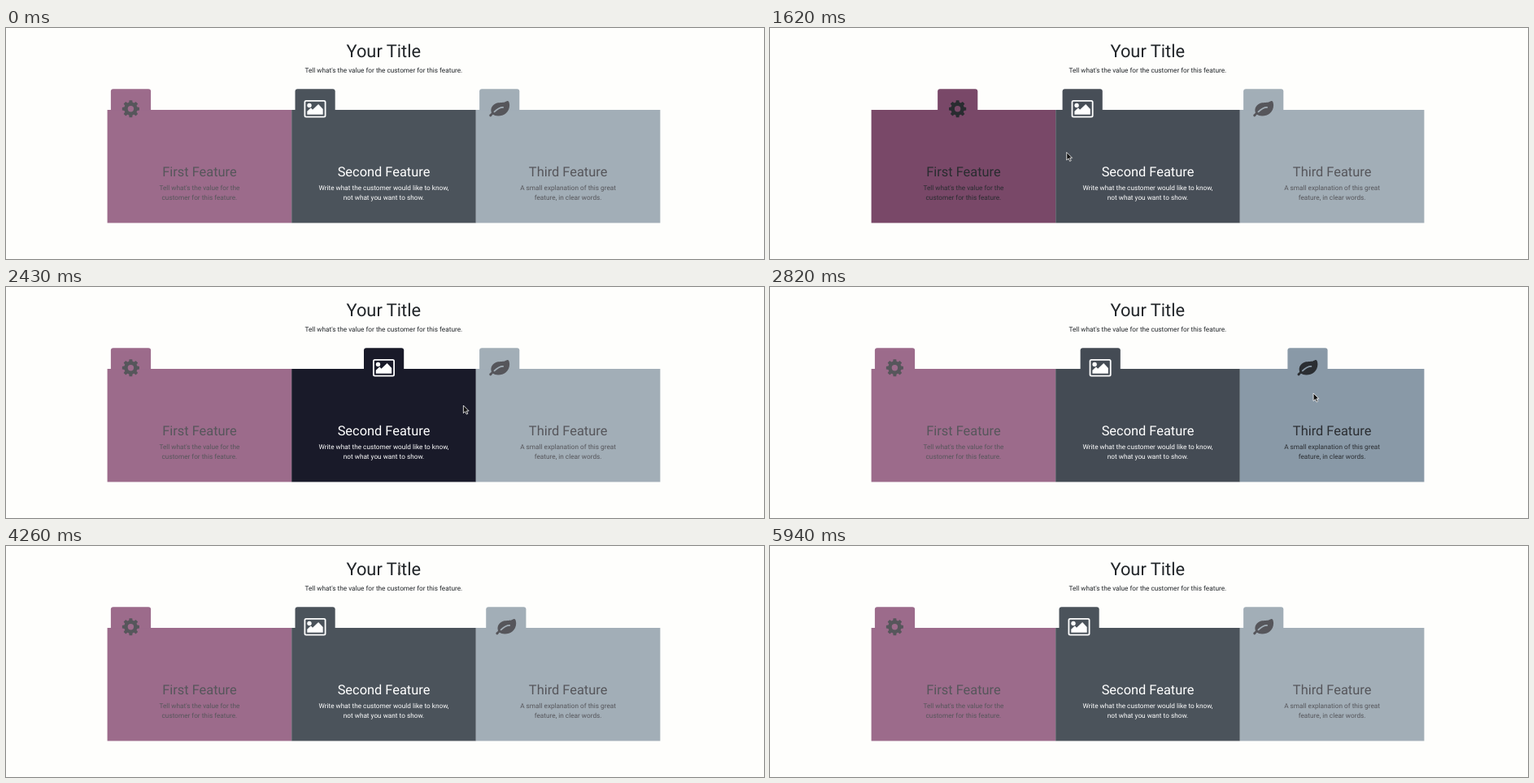
Write an HTML page that moves like this. It is 932x285 px and loops after 5970 ms.

```html
<!DOCTYPE html>
<html lang="en">
<head>
<meta charset="utf-8">
<title>Feature cards</title>
<style>
  html, body { margin: 0; width: 100%; height: 100%; overflow: hidden; background: #fefefc; }
  svg { display: block; width: 932px; height: 285px; }
  text { font-family: Roboto, sans-serif; font-size: 8.22px; text-anchor: middle; text-rendering: geometricPrecision; }
  .title { font-size: 21.8px; }
  .heading { font-size: 16.4px; }
</style>
</head>
<body>
<svg id="stage" viewBox="0 0 932 285">
  <g fill="#212529">
    <text class="title" x="464.3" y="36.3">Your Title</text>
    <text x="464.3" y="55">Tell what's the value for the customer for this feature.</text>
  </g>
  <g id="cards"></g>
  <g id="cursor">
    <path id="arrow" d="M0 0V9.6L2.3 7.6L3.9 11L5.5 10.2L3.9 6.9H6.8Z" fill="#111" stroke="#fff" stroke-width=".8"/>
    <path id="beam" d="M-2-5H2M0-5V5M-2 5H2" fill="none" stroke="#333" stroke-width=".8"/>
  </g>
</svg>
<script>
const LOOP = 5970, SLIDE = 860, FADE = 620, SHIFT = 84.5;
const CARD_X = 124.6, CARD_W = 226.6;
const $ = id => document.getElementById(id);

function gearPath() {
  const points = [];
  for (let tooth = 0; tooth < 8; tooth++) {
    for (const [offset, radius] of [[-.27, 8.2], [-.17, 10.7], [.17, 10.7], [.27, 8.2]]) {
      const angle = tooth * Math.PI / 4 + offset;
      points.push(`${radius * Math.cos(angle)} ${radius * Math.sin(angle)}`);
    }
  }
  return `M${points.join('L')}ZM3.7 0A3.7 3.7 0 1 0-3.7 0A3.7 3.7 0 1 0 3.7 0Z`;
}

const gear = `<path d="${gearPath()}" fill-rule="evenodd"/>`;
const picture = `<rect x="-12.6" y="-9.9" width="25.2" height="19.8" rx="1.6" fill="none" stroke="currentColor" stroke-width="1.8"/>
  <circle cx="-7" cy="-4.2" r="2.7"/><path d="M-9.7 7.1V3L-5.2-1.2L-3 1L4.1-5.6L9.7 .2V7.1Z"/>`;
const leaf = `<g transform="translate(-12.5 -9.8)">
  <path d="M22.9 0C24.5 0 25 4 25 5.3C25 14 18 18.6 11 18.6C8 18.6 6 17.5 4.5 16.8C3.7 16.8 3 19.6 1.7 19.6C.8 19.6 0 18.6 .1 17.9C.1 16.3 2.8 15.5 2.8 14.5C.9 9 4.5 4 9.7 2.6C13 1.7 18 2.6 20.5 .8C21.4 .1 22 0 22.9 0Z"/>
  <path class="vein" d="M17 8C12.4 8 9.5 10.5 6.4 13.5" fill="none" stroke-width="1.8" stroke-linecap="round"/></g>`;

const DARK_TEXT = [[86, 86, 91], [33, 37, 41]];
const WHITE_TEXT = [[255, 255, 255], [255, 255, 255]];

// Colour pairs are [idle, hovered]; hover is [enter, leave] in ms.
const cards = [
  { hover: [500, 1540], fill: [[156, 107, 139], [115, 66, 98]], ink: DARK_TEXT, icon: gear,
    heading: 'First Feature', lines: ["Tell what's the value for the", 'customer for this feature.'] },
  { hover: [1565, 2472], fill: [[75, 83, 91], [25, 26, 41]], ink: WHITE_TEXT, icon: picture,
    heading: 'Second Feature', lines: ['Write what the customer would like to know,', 'not what you want to show.'] },
  { hover: [2500, 3720], fill: [[162, 174, 183], [132, 148, 163]], ink: DARK_TEXT, icon: leaf,
    heading: 'Third Feature', lines: ['A small explanation of this great', 'feature, in clear words.'] }
];

$('cards').innerHTML = cards.map((card, i) => `
  <g transform="translate(${CARD_X + i * CARD_W} 0)">
    <rect class="bg" y="101" width="${CARD_W}" height="139.5"/>
    <g class="tab">
      <path class="bg" d="M4.3 101.5V78.3Q4.3 75.3 7.3 75.3H50.5Q53.5 75.3 53.5 78.3V101.5Z"/>
      <g class="ink" transform="translate(28.8 99.7)">${card.icon}</g>
    </g>
    <g class="ink">
      <text class="heading" x="113.3" y="182.6">${card.heading}</text>
      ${card.lines.map((line, n) => `<text x="113.3" y="${200 + n * 12.3}">${line}</text>`).join('')}
    </g>
  </g>`).join('');
cards.forEach((card, i) => {
  const root = $('cards').children[i];
  card.tab = root.querySelector('.tab');
  card.backgrounds = root.querySelectorAll('.bg');
  card.inks = root.querySelectorAll('.ink');
  card.vein = root.querySelector('.vein');
});

// The CSS "ease" curve, cubic-bezier(.25, .1, .25, 1).
function ease(x) {
  if (x <= 0) return 0;
  if (x >= 1) return 1;
  const bezier = (a, b, s) => 3 * a * s * (1 - s) ** 2 + 3 * b * s * s * (1 - s) + s ** 3;
  let low = 0, high = 1;
  for (let i = 0; i < 24; i++) {
    const mid = (low + high) / 2;
    if (bezier(.25, .25, mid) < x) low = mid; else high = mid;
  }
  return bezier(.1, 1, low);
}

const hoverAmount = ([enter, leave], t, duration) =>
  ease((t - enter) / duration) - ease((t - leave) / duration);
const mix = ([from, to], k) => `rgb(${from.map((c, i) => Math.round(c + (to[i] - c) * k))})`;

// Cursor stops: time, x, y.
const route = [
  [60, 150, -12], [300, 110, 85], [500, 126, 118], [1020, 202, 143], [1555, 351, 153],
  [1920, 427, 155], [2490, 578, 145], [2820, 668, 131], [3150, 700, 120],
  [3700, 601, 101], [3780, 588.5, 88], [4260, 484, 29], [4500, 440, -14]
];

function cursorAt(t) {
  const next = route.findIndex(stop => stop[0] > t);
  if (next < 1) return null;
  const [t0, x0, y0] = route[next - 1], [t1, x1, y1] = route[next];
  const k = (t - t0) / (t1 - t0);
  return [x0 + (x1 - x0) * k, y0 + (y1 - y0) * k];
}

function draw(t) {
  for (const card of cards) {
    const fade = hoverAmount(card.hover, t, FADE);
    const fill = mix(card.fill, fade), ink = mix(card.ink, fade);
    card.tab.setAttribute('transform', `translate(${SHIFT * hoverAmount(card.hover, t, SLIDE)} 0)`);
    card.backgrounds.forEach(node => node.style.fill = fill);
    card.inks.forEach(node => node.style.fill = node.style.color = ink);
    if (card.vein) card.vein.style.stroke = fill;
  }
  const point = cursorAt(t);
  $('cursor').style.display = point ? '' : 'none';
  if (point) {
    const [x, y] = point;
    const overText = x > 360 && x < 568 && y > 12 && y < 60;
    $('cursor').setAttribute('transform', `translate(${x} ${y})`);
    $('beam').style.display = overText ? '' : 'none';
    $('arrow').style.display = overText ? 'none' : '';
  }
}

const start = performance.now();
function tick() {
  draw((performance.now() - start) % LOOP);
  requestAnimationFrame(tick);
}
tick();
</script>
</body>
</html>
```
